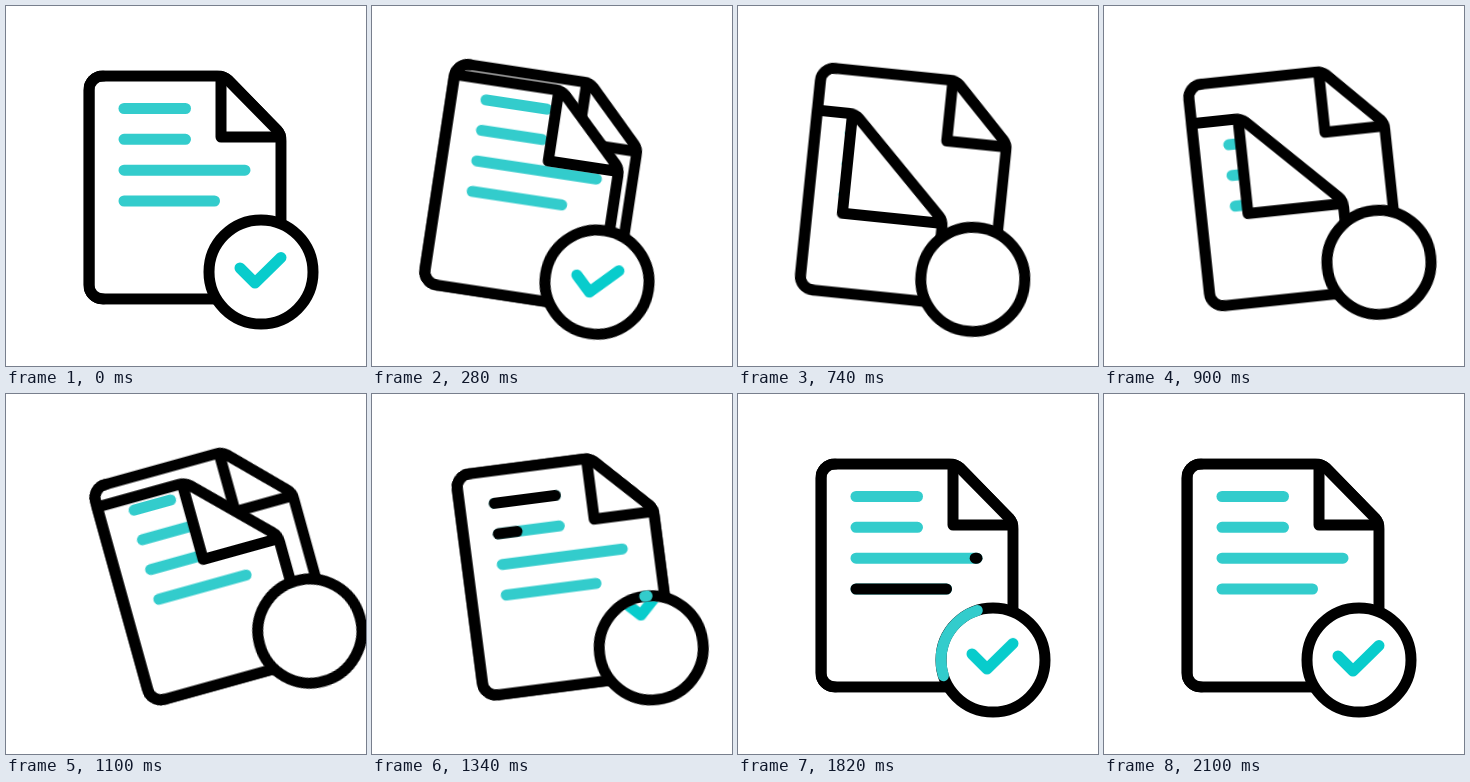
Write an HTML page that moves like this. It is 360 by 360 pixels and loops after 2400 ms.

```html
<!DOCTYPE html>
<html lang="en">
<head>
<meta charset="utf-8">
<title>Document check</title>
<style>
@property --head { syntax: '<number>'; inherits: false; initial-value: 0; }
@property --tail { syntax: '<number>'; inherits: false; initial-value: 0; }

html, body { margin: 0; width: 100%; height: 100%; overflow: hidden; background: #fff; }
svg { display: block; width: 100vw; height: 100vh; }
path, circle { fill: none; stroke: #000; stroke-width: 11; stroke-linecap: round; stroke-linejoin: round; }
.paper { fill: #fff; }
.bare { stroke: none; }
.cyan { stroke: #33cccc; }
.tick { stroke: #08cccc; }

.icon, .page, .flap, .tick, .first, .sweep, .arc { animation: 2400ms linear infinite; }

/* whole icon swings right, left, then settles */
.icon { transform-origin: 173px 72px; animation-name: swing; }
@keyframes swing {
  0%, 5% { transform: rotate(0deg); animation-timing-function: cubic-bezier(.167, .167, .667, 1); }
  21.04% { transform: rotate(16deg); animation-timing-function: cubic-bezier(.333, 0, .667, 1); }
  47.08% { transform: rotate(-15.7deg); animation-timing-function: cubic-bezier(.333, 0, .25, 1); }
  71.67%, 100% { transform: rotate(0deg); }
}

/* front sheet peels down and back; the back sheet stays */
.page { animation-name: peel; }
.flap { animation-name: fold; }
@keyframes peel {
  0%, 5% {
    d: path("M83 70H211Q218 70 222 74L271 124Q275 128 275 135V293H83Z");
    animation-timing-function: cubic-bezier(.167, .167, .8, .92);
  }
  33.1% {
    d: path("M83 115.8H109.6Q116.6 115.8 120.6 119.8L212.2 210.8Q216.2 214.8 216.2 221.8V293H83Z");
    animation-timing-function: cubic-bezier(.2, .08, .833, .833);
  }
  54.17%, 100% { d: path("M83 70H211Q218 70 222 74L271 124Q275 128 275 135V293H83Z"); }
}
@keyframes fold {
  0%, 5% { d: path("M215 73V131H272"); animation-timing-function: cubic-bezier(.167, .167, .8, .92); }
  33.1% { d: path("M113.6 118.8V217.8H213.2"); animation-timing-function: cubic-bezier(.2, .08, .833, .833); }
  54.17%, 100% { d: path("M215 73V131H272"); }
}

/* tick leaves below the badge and returns from above */
.tick { animation-name: drop; }
@keyframes drop {
  0%, 18.33% { transform: translateY(0); animation-timing-function: cubic-bezier(.333, 0, .667, 1); }
  31.67% { transform: translateY(66px); animation-timing-function: step-end; }
  41.67% { transform: translateY(-65px); animation-timing-function: cubic-bezier(.333, 0, .667, 1); }
  80%, 100% { transform: translateY(0); }
}

/* top line regrows as the sheet comes back */
.first { animation-name: regrow; }
@keyframes regrow {
  0%, 29% { stroke-dasharray: 100px 200px; }
  29.01%, 43.33% { stroke-dasharray: 1px 200px; }
  47.5%, 100% { stroke-dasharray: 100px 200px; }
}

/* black stroke runs along each line in turn */
.sweep { opacity: 0; animation-name: sweep; animation-delay: var(--at); }
@keyframes sweep {
  0% {
    opacity: 1; stroke-dasharray: 0px 200px; stroke-dashoffset: 0px;
    animation-timing-function: cubic-bezier(.333, 0, .667, 1);
  }
  9.17% {
    opacity: 1; stroke-dasharray: 100px 200px; stroke-dashoffset: 0px;
    animation-timing-function: cubic-bezier(.333, 0, .667, 1);
  }
  18.33% { opacity: 1; stroke-dasharray: 0px 200px; stroke-dashoffset: -100px; }
  18.34%, 100% { opacity: 0; stroke-dasharray: 0px 200px; stroke-dashoffset: -100px; }
}

/* cyan arc runs round the badge */
.arc {
  stroke-dasharray: calc(1px * (var(--head) - var(--tail))) 200px;
  stroke-dashoffset: calc(-1px * var(--tail));
  animation-name: head, tail, show;
}
@keyframes head {
  0%, 54.58% { --head: 0; animation-timing-function: cubic-bezier(.333, 0, .667, 1); }
  79.17%, 100% { --head: 100; }
}
@keyframes tail {
  0%, 55.42% { --tail: 0; animation-timing-function: cubic-bezier(.333, 0, .667, 1); }
  87.5%, 100% { --tail: 100; }
}
@keyframes show {
  0%, 54.9% { opacity: 0; }
  54.91%, 87.4% { opacity: 1; }
  87.41%, 100% { opacity: 0; }
}
</style>
</head>
<body>
<svg viewBox="0 0 360 360">
  <defs>
    <clipPath id="sheet"><rect x="77.5" y="64.5" width="203" height="234" rx="19.5"/></clipPath>
    <clipPath id="front"><path class="page" d="M83 70H211Q218 70 222 74L271 124Q275 128 275 135V293H83Z"/></clipPath>
    <clipPath id="badge"><circle cx="255" cy="266" r="47"/></clipPath>
  </defs>
  <g class="icon">
    <g clip-path="url(#sheet)">
      <path class="paper" d="M83 70H211Q218 70 222 74L271 124Q275 128 275 135V293H83Z"/>
      <path d="M215 73V131H272"/>
      <path class="page paper bare" d="M83 70H211Q218 70 222 74L271 124Q275 128 275 135V293H83Z"/>
      <g clip-path="url(#front)">
        <path class="cyan first" pathLength="100" d="M118 102.5H179.5"/>
        <path class="cyan" d="M118 133.3H179.5M118 164.2H239M118 195H208.5"/>
        <path class="sweep" style="--at:1125ms" pathLength="100" d="M118 102.5H179.5"/>
        <path class="sweep" style="--at:1260ms" pathLength="100" d="M118 133.3H179.5"/>
        <path class="sweep" style="--at:1397ms" pathLength="100" d="M118 164.2H239"/>
        <path class="sweep" style="--at:1600ms" pathLength="100" d="M118 195H208.5"/>
      </g>
      <path class="flap paper" d="M215 73V131H272"/>
      <path class="page" d="M83 70H211Q218 70 222 74L271 124Q275 128 275 135V293H83Z"/>
      <path d="M97 70A14 14 0 0 0 83 84V279A14 14 0 0 0 97 293"/>
    </g>
    <circle class="paper bare" cx="255" cy="266" r="52"/>
    <g clip-path="url(#badge)"><path class="tick" d="M234 262L249 277L275 251.5"/></g>
    <circle cx="255" cy="266" r="52"/>
    <path class="cyan arc" pathLength="100" d="M255 214A52 52 0 0 1 255 318A52 52 0 0 1 255 214"/>
  </g>
</svg>
</body>
</html>
```
